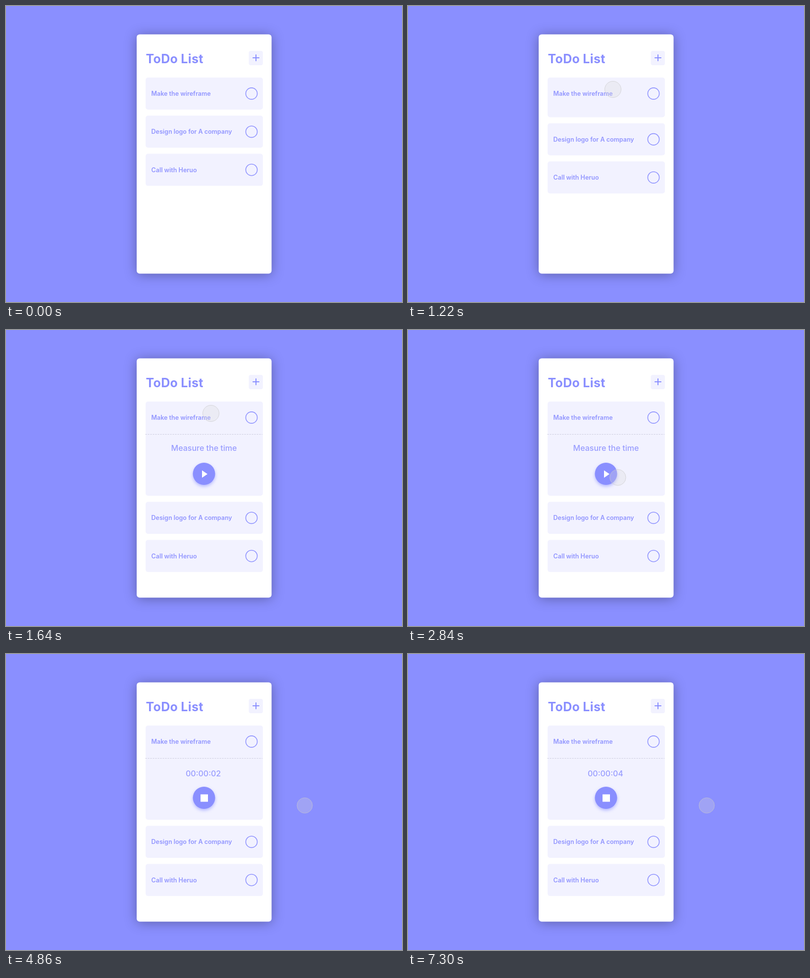
Write an HTML page that moves like this. It is 800 px wide and 600 px high and loops after 8 s.

```html
<!DOCTYPE html>
<html lang="en">
<head>
<meta charset="utf-8">
<title>ToDo List</title>
<style>
  html, body { margin: 0; width: 100%; height: 100%; overflow: hidden; background: #8a8fff; }
  svg { display: block; width: 800px; height: 600px; }
  text { font-family: Inter, Roboto, sans-serif; fill: #8a8fff; }
  .title { font-size: 25px; font-weight: 700; letter-spacing: .3px; }
  .task { font-size: 12.5px; font-weight: 600; fill: #9195ff; }
  .info { font-size: 16px; font-weight: 500; fill: #999dff; }
  .card { fill: #f2f2ff; }
  .ring { fill: none; stroke: #9195ff; stroke-width: 1.6; }
  .sheet { fill: #fff; filter: drop-shadow(0 2px 12px rgba(0, 0, 0, .33)); }
  .button { fill: #8a8fff; filter: drop-shadow(0 3px 3px rgba(138, 143, 255, .6)); }
  .cursor { fill: #d8d8d8; fill-opacity: .28; stroke: #c8c8c8; stroke-opacity: .65; stroke-width: 1; }
</style>
</head>
<body>
<svg viewBox="0 0 800 600">
  <defs>
    <clipPath id="fold"><rect id="foldBox" x="281" y="145" width="238" height="65"/></clipPath>
  </defs>
  <rect class="sheet" x="264" y="57.5" width="272.5" height="485" rx="6"/>
  <text class="title" x="282.5" y="116">ToDo List</text>
  <rect class="card" x="490.5" y="91" width="28.5" height="29" rx="4"/>
  <path d="M498.2 105H511.8M505 98.2V111.8" stroke="#8a8fff" stroke-width="2"/>
  <g id="tasks"></g>
  <g clip-path="url(#fold)">
    <g id="panel">
      <path d="M281.5 211.5H518" stroke="#cbcbdd" stroke-width="1.1" stroke-dasharray="3 2"/>
      <text class="info" id="prompt" x="400" y="245" text-anchor="middle">Measure the time</text>
      <text class="info" id="clock" x="363" y="248"></text>
      <circle class="button" cx="400" cy="291.5" r="22.5"/>
      <path id="play" d="M396 284.5L407 292L396 299.5Z" fill="#fff"/>
      <rect id="stop" x="393" y="284.5" width="15" height="15" fill="#fff"/>
    </g>
  </g>
  <circle class="cursor" id="cursor" r="16.3"/>
</svg>
<script>
const LOOP = 8000;
const CLICK = 3540;
const FIRST_TICK = 3640;
const TICK = 1220;
const GROW = 126;

const $ = id => document.getElementById(id);
const set = (el, attrs) => { for (const k in attrs) el.setAttribute(k, attrs[k]); };
const show = (el, on) => set(el, { visibility: on ? "visible" : "hidden" });
const clamp = v => Math.max(0, Math.min(1, v));
const span = (t, start, end) => clamp((t - start) / (end - start));

const inOut = n => p => p < .5 ? 2 ** (n - 1) * p ** n : 1 - (2 - 2 * p) ** n / 2;
const outCubic = p => 1 - (1 - p) ** 3;
const fold = inOut(3);

$("tasks").innerHTML = ["Make the wireframe", "Design logo for A company", "Call with Heruo"]
  .map((label, i) => `<g transform="translate(0 ${145 + i * 77.3})">
    <rect class="card" x="282" width="237" height="65" rx="5"/>
    <text class="task" x="293.5" y="37">${label}</text>
    <circle class="ring" cx="496" cy="32.5" r="11.6"/></g>`).join("");
const tasks = [...$("tasks").children];
const firstCard = tasks[0].querySelector("rect");

// Each move follows a quadratic curve: start, control, end.
const moves = [
  { from: 360, to: 830, ease: inOut(2), path: [[660, 45], [378, 110], [414, 169]], r: [16, 16.5] },
  { from: 2130, to: 3350, ease: outCubic, path: [[414, 169], [535, 332], [406.5, 294.5]], r: [16.5, 16.2] },
  { from: 3740, to: 4110, ease: inOut(5), path: [[406.5, 294.5], [500, 294.5], [603.5, 307]], r: [16.2, 15.6] }
];

function curve([a, b, c], s) {
  const q = 1 - s;
  return a.map((v, i) => q * q * v + 2 * q * s * b[i] + s * s * c[i]);
}

function drawCursor(t) {
  const m = moves.filter(m => t >= m.from).pop() || moves[0];
  const s = m.ease(span(t, m.from, m.to));
  const [cx, cy] = curve(m.path, s);
  set($("cursor"), { cx, cy, r: m.r[0] + (m.r[1] - m.r[0]) * s, opacity: span(t, 360, 440) });
  show($("cursor"), t >= 380);
}

function drawCards(t) {
  const open = fold(span(t, 1030, 1640));
  const height = 65 + GROW * open;
  set(firstCard, { height });
  set($("foldBox"), { height });
  tasks.forEach((g, i) => {
    const y = 145 + i * 77.3 + (i ? GROW * open : 0);
    set(g, { transform: `translate(0 ${y})` });
  });
  set($("panel"), { opacity: clamp((open - .15) / .85) });
}

function drawTimer(t) {
  const running = t >= CLICK;
  const seconds = t < FIRST_TICK ? 0 : 1 + Math.floor((t - FIRST_TICK) / TICK);
  $("clock").textContent = "00:00:0" + seconds;
  show($("prompt"), !running);
  show($("play"), !running);
  show($("clock"), running);
  show($("stop"), running);
}

function draw(t) {
  drawCards(t);
  drawTimer(t);
  drawCursor(t);
}

const begin = performance.now();
function frame(now) {
  draw(Math.max(0, now - begin) % LOOP);
  requestAnimationFrame(frame);
}
draw(0);
requestAnimationFrame(frame);
</script>
</body>
</html>
```
